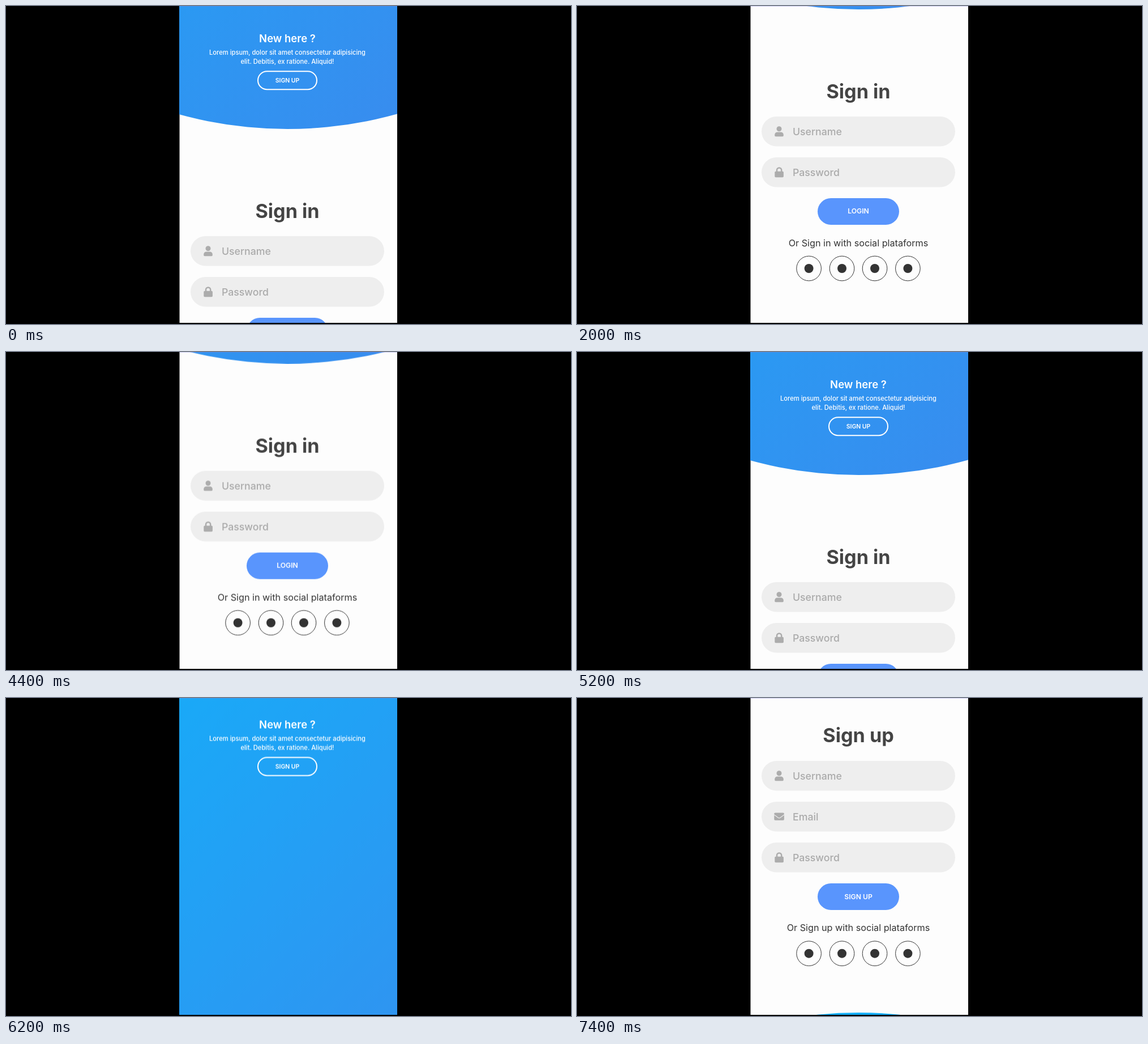
An HTML page for the animation above (8000 ms loop, 998x561 px).

```html
<!DOCTYPE html>
<html lang="en">
<head>
<meta charset="utf-8">
<title>Sign in and sign up</title>
<style>
  html, body { margin: 0; width: 100%; height: 100%; overflow: hidden; background: #000; }
  svg { display: block; width: 998px; height: 561px; font-family: Inter, "Open Sans", sans-serif; }
  text { white-space: pre; }
  .mid { text-anchor: middle; }
  .title { font-size: 34.2px; font-weight: 700; fill: #444; }
  .hint { font-size: 17.7px; font-weight: 500; fill: #aaa; }
  .field { fill: #eee; }
  .icon { fill: #acacac; }
  .label { font-size: 12.2px; font-weight: 600; fill: #fff; }
  .note { font-size: 16.2px; fill: #333; }
  .panel { fill: #fff; }
  .panel .head { font-size: 18.5px; font-weight: 600; }
  .panel .body { font-size: 11.2px; font-weight: 500; }
  .panel .small { font-size: 10.5px; font-weight: 600; }

  .scroll, .forms, .in, .up, .disc, .panel {
    animation: 8s linear infinite;
  }
  .scroll { animation-name: scroll; }
  .forms { animation-name: lift; }
  .in { animation-name: hide; }
  .up { animation-name: show; }
  .disc { animation-name: sweep; }
  .panel { animation-name: leave; }

  @keyframes scroll {
    0%, 11.25% { transform: translateY(0); animation-timing-function: ease-in-out; }
    21.5%, 53.2% { transform: translateY(-211px); animation-timing-function: ease-in-out; }
    63%, 100% { transform: translateY(0); }
  }
  /* the switch to sign-up starts at 5280 ms = 66% */
  @keyframes sweep {
    0%, 66% { transform: translateY(0); animation-timing-function: ease-in-out; }
    91%, 100% { transform: translateY(1778px); }
  }
  @keyframes lift {
    0%, 76% { transform: translateY(0); animation-timing-function: ease-in-out; }
    88.5%, 100% { transform: translateY(-260px); }
  }
  @keyframes leave {
    0%, 76% { transform: translateY(0); animation-timing-function: ease-in-out; }
    87.25%, 100% { transform: translateY(-288px); }
  }
  @keyframes hide {
    0%, 74.75% { opacity: 1; }
    77.25%, 100% { opacity: 0; }
  }
  @keyframes show {
    0%, 74.75% { opacity: 0; }
    77.25%, 100% { opacity: 1; }
  }
</style>
</head>
<body>
<svg viewBox="0 0 998 561">
  <defs>
    <clipPath id="screen"><rect x="306.5" width="384.5" height="559"/></clipPath>
    <linearGradient id="sky" x1="1" y1="1" x2="0" y2="0">
      <stop offset="0" stop-color="#4481eb"/>
      <stop offset="1" stop-color="#04befe"/>
    </linearGradient>

    <rect id="field" class="field" x="326" width="342" height="52.5" rx="26.25"/>
    <g id="user">
      <use href="#field"/>
      <g class="icon">
        <circle cx="357" cy="21.8" r="4.5"/>
        <path d="M349.2 33.6v-1.4a4.8 4.8 0 0 1 4.8-4.8h6a4.8 4.8 0 0 1 4.8 4.8v1.4a1.6 1.6 0 0 1-1.6 1.6h-12.4a1.6 1.6 0 0 1-1.6-1.6z"/>
      </g>
      <text class="hint" x="381" y="32.5">Username</text>
    </g>
    <g id="mail">
      <use href="#field"/>
      <rect class="icon" x="348.3" y="19.5" width="17.6" height="13.2" rx="1.8"/>
      <path d="M348 22.8l7.4 5.4q1.7 1.1 3.4 0l7.4-5.4" fill="none" stroke="#eee" stroke-width="1.1"/>
      <text class="hint" x="381" y="32.5">Email</text>
    </g>
    <g id="lock">
      <use href="#field"/>
      <rect class="icon" x="349.3" y="24.8" width="15.6" height="10.4" rx="1.7"/>
      <path d="M353 25.5v-3a4.1 4.1 0 0 1 8.2 0v3" fill="none" stroke="#acacac" stroke-width="2.5"/>
      <text class="hint" x="381" y="32.5">Password</text>
    </g>
    <rect id="button" x="425" width="144" height="47" rx="23.5" fill="#5995fd"/>
    <g id="ring">
      <circle r="21.8" fill="none" stroke="#333" stroke-width="1"/>
      <circle r="8" fill="#333"/>
    </g>
    <g id="social">
      <use href="#ring" x="409.6"/>
      <use href="#ring" x="468"/>
      <use href="#ring" x="526"/>
      <use href="#ring" x="584.4"/>
    </g>
  </defs>

  <rect width="998" height="561" fill="#000"/>
  <g clip-path="url(#screen)">
    <rect x="306" width="386" height="560" fill="#fdfdfd"/>
    <g class="scroll">
      <g class="forms">
        <g class="in">
          <text class="title mid" x="497" y="374">Sign in</text>
          <use href="#user" y="406"/>
          <use href="#lock" y="478"/>
          <use href="#button" y="550"/>
          <text class="label mid" x="497" y="577.2">LOGIN</text>
          <text class="note mid" x="497" y="635">Or Sign in with social plataforms</text>
          <use href="#social" y="674"/>
        </g>
        <g class="up">
          <text class="title mid" x="497" y="338">Sign up</text>
          <use href="#user" y="371"/>
          <use href="#mail" y="443"/>
          <use href="#lock" y="515"/>
          <use href="#button" y="587"/>
          <text class="label mid" x="497" y="614.5">SIGN UP</text>
          <text class="note mid" x="497" y="671">Or Sign up with social plataforms</text>
          <use href="#social" y="710.7"/>
        </g>
      </g>
      <circle class="disc" cx="497" cy="-503" r="720" fill="url(#sky)"/>
      <g class="panel mid">
        <text class="head" x="497" y="63.5">New here ?</text>
        <text class="body" x="497" y="86">Lorem ipsum, dolor sit amet consectetur adipisicing</text>
        <text class="body" x="497" y="102">elit. Debitis, ex ratione. Aliquid!</text>
        <rect x="445" y="115.2" width="104" height="32" rx="16" fill="none" stroke="#fff" stroke-width="2"/>
        <text class="small" x="497" y="135.3">SIGN UP</text>
      </g>
    </g>
    <rect x="306" width="386" height="1" fill="#7878dc" opacity=".35"/>
  </g>
</svg>
</body>
</html>
```
